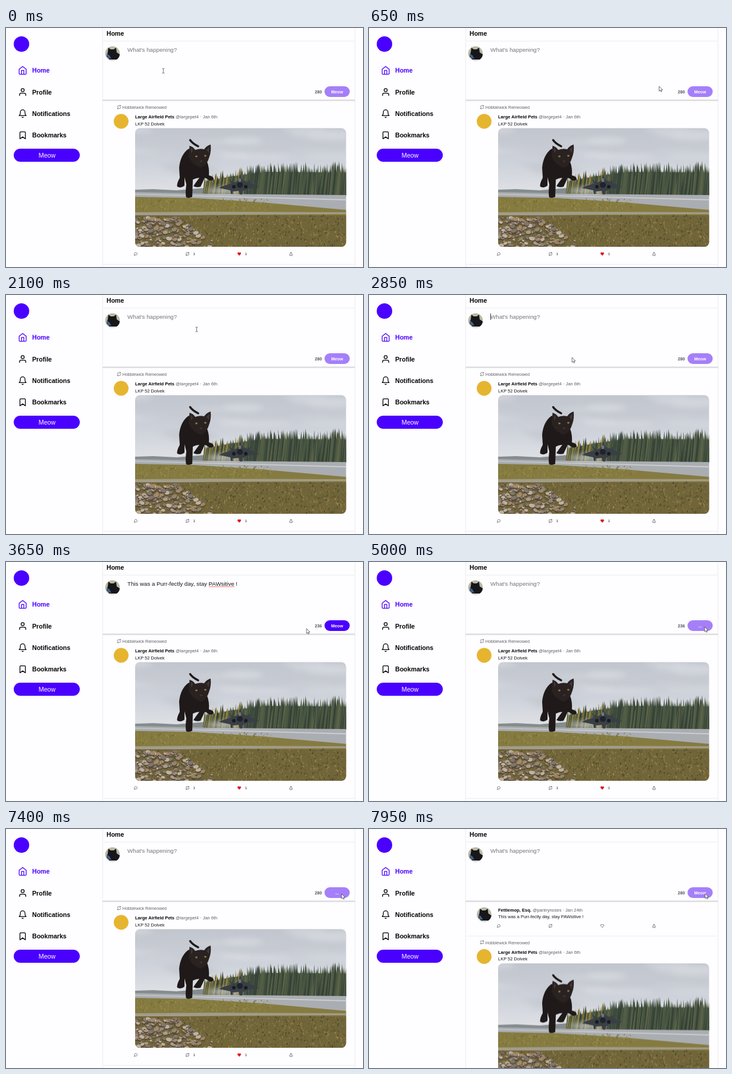
These frames come from a looping animation (600 px wide and 402 px high, 8000 ms). An HTML page:

```html
<!DOCTYPE html>
<html lang="en">
<head>
<meta charset="utf-8">
<title>Meow feed</title>
<style>
html, body { margin: 0; width: 100%; height: 100%; overflow: hidden; background: #fefdff; }
svg { display: block; width: 600px; height: 402px; font-family: "Liberation Sans", Arial, sans-serif; font-size: 7.5px; fill: #17171b; }
.bold { font-weight: 700; }
.nav { font-size: 10.6px; font-weight: 700; fill: #050505; }
.grey { fill: #606066; }
.small { font-size: 7.2px; font-weight: 700; }
.line { stroke: #ededf0; stroke-width: 1; }
.icon { fill: none; stroke: currentColor; stroke-width: 2; stroke-linecap: round; stroke-linejoin: round; }
</style>
</head>
<body>
<svg id="stage" viewBox="0 0 600 402"></svg>
<script>
const PURPLE = '#4a00ff', PALE = '#a57ff9';
const MESSAGE = 'This was a Purr-fectly day, stay PAWsitive !';
const ICONS = {
  home: 'M3 9l9-7 9 7v11a2 2 0 0 1-2 2H5a2 2 0 0 1-2-2zM9 22V12h6v10',
  user: 'M20 21v-2a4 4 0 0 0-4-4H8a4 4 0 0 0-4 4v2M8 7a4 4 0 1 0 8 0a4 4 0 1 0-8 0',
  bell: 'M18 8A6 6 0 0 0 6 8c0 7-3 9-3 9h18s-3-2-3-9M13.7 21a2 2 0 0 1-3.4 0',
  bookmark: 'M19 21l-7-5-7 5V5a2 2 0 0 1 2-2h10a2 2 0 0 1 2 2z',
  repeat: 'M17 1l4 4-4 4M3 11V9a4 4 0 0 1 4-4h14M7 23l-4-4 4-4M21 13v2a4 4 0 0 1-4 4H3',
  comment: 'M3 21l2-6A8.5 8.5 0 1 1 9 19z',
  heart: 'M12 21L3.2 12.3A5.5 5.5 0 0 1 11 4.6l1 1 1-1a5.5 5.5 0 0 1 7.8 7.7z',
  share: 'M4 12v8a2 2 0 0 0 2 2h12a2 2 0 0 0 2-2v-8M16 6l-4-4-4 4M12 2v13'
};

let seed = 11;
const random = (low = 0, high = 1) => {
  seed = (seed * 16807) % 2147483647;
  return low + (high - low) * seed / 2147483647;
};
const pick = list => list[Math.floor(random(0, list.length))];
const many = (count, draw) => Array.from({ length: count }, draw).join('');

const text = (x, y, content, attrs = '') => `<text x="${x}" y="${y}" ${attrs}>${content}</text>`;
const path = (d, fill, attrs = '') => `<path d="${d}" fill="${fill}" ${attrs}/>`;
const rect = (x, y, w, h, fill, attrs = '') =>
  `<rect x="${x}" y="${y}" width="${w}" height="${h}" fill="${fill}" ${attrs}/>`;
const ellipse = (x, y, rx, ry, fill, attrs = '') =>
  `<ellipse cx="${x}" cy="${y}" rx="${rx}" ry="${ry}" fill="${fill}" ${attrs}/>`;
const rule = y => `<path class="line" d="M162 ${y}H587"/>`;
const icon = (name, cx, cy, size, color = '#17171b', fill = 'none') =>
  `<path class="icon" d="${ICONS[name]}" style="color:${color};fill:${fill}"
    transform="translate(${cx - size / 2} ${cy - size / 2}) scale(${size / 24})"/>`;

const portrait = (cx, cy) => `<g transform="translate(${cx} ${cy})" clip-path="url(#round)">
  ${rect(-13, -13, 26, 26, '#b9b9a2')}${rect(-13, 4, 26, 9, '#dedbd4')}
  ${path('M-7-10l4 3h5l4-3 1 8 6 4-1 6-5 2H-5l-5-5 2-7z', '#17161b')}
  ${path('M-10 0l5 3 3 6-6-2z', '#3d648f')}</g>`;

const author = (y, name, rest) =>
  text(217, y, `<tspan class="bold" fill="#050505">${name}</tspan> <tspan class="grey">${rest}</tspan>`);

const actions = (y, count) => icon('comment', 218, y, 6.4) + icon('repeat', 305, y, 6.6) +
  icon('heart', 392, y, 6.6, count ? '#e0101c' : '#17171b', count ? '#e0101c' : 'none') +
  icon('share', 479, y, 6.6) +
  (count ? text(314.5, y + 2.2, count, 'font-size="6.2"') + text(401.5, y + 2.2, count, 'font-size="6.2"') : '');

function trees() {
  return path('M336 258l40-8 60-8 136 1v40H336z', '#4d5842') + many(230, (_, i) => {
    const x = 334 + i * 1.04;
    const rise = Math.min(1, (x - 330) / 105);
    const top = 280 - (30 + 20 * rise) * random(0.6, 1.12);
    const w = random(3, 6);
    const color = x < 405 && random() < 0.55
      ? pick(['#8d7a3a', '#9b8640', '#727040']) : pick(['#3d4b3e', '#46553f', '#525c45', '#354238', '#5c6348']);
    return path(`M${x} ${top}l${w} ${281 - top}h${-2 * w}z`, color);
  });
}

function stones() {
  return many(190, () => {
    const y = random(319, 369), x = 215 + random() * (72 + (y - 318) * 1.5);
    const r = random(1.8, 5.2);
    const tilt = `transform="rotate(${random(-25, 25)} ${x} ${y})"`;
    return ellipse(x, y + 1, r, r * 0.75, '#4c4236', tilt) +
      ellipse(x, y, r * 0.94, r * 0.62, pick(['#aa9c86', '#94846f', '#bfb19f', '#81766b', '#a3896c']), tilt);
  });
}

const grass = (count, x0, x1, y0, y1, colors) => many(count, () =>
  `<path d="M${random(x0, x1)} ${random(y0, y1)}l${random(-2, 2)} ${random(-4, -1)}"
    stroke="${pick(colors)}" stroke-width="${random(0.6, 1.8)}"/>`);

function photo() {
  const cat = '#1f1a19', jet = '#3a3f45';
  return `<g clip-path="url(#frame)">
    ${rect(217, 168, 355, 200, 'url(#sky)')}
    <g filter="url(#soft)">${many(26, () => ellipse(random(215, 575), random(170, 255), random(30, 70), random(3, 8),
      pick(['#dfe2e8', '#c3c7d0', '#d8dbe2']), 'opacity=".5"'))}</g>
    ${path('M217 272l30-1 40 2 60-5v14H217z', '#858c8e')}
    ${trees()}
    ${path('M217 276l130 3 225 2v26l-160-14-195-8z', '#aaadb1')}
    ${path('M217 279l355 9v2l-355-10z', '#cdcfd1')}
    <g filter="url(#soft)">${ellipse(367, 274, 30, 6, '#d3d5d6', 'opacity=".7"')}</g>
    ${path('M217 284l100 2 110 7 145 13v62H217z', '#857b41')}
    ${grass(260, 217, 450, 289, 308, ['#958949', '#71692f', '#9c8e4c', '#7b743c'])}
    ${path('M217 310l130-1 225 1v3l-200 1-155 2z', '#a29c8a')}
    ${rect(217, 315, 355, 53, '#71653a')}
    ${grass(850, 217, 572, 317, 370, ['#8a7b45', '#54502c', '#98804a', '#645f35', '#494627'])}
    ${stones()}
    ${grass(130, 290, 560, 320, 368, ['#9d7439', '#5a572f', '#a88d4a', '#726a3a'])}
    ${path('M393 246l4 9 6 3 21 8-1 3-17 1-4 3-4 1-1 6h-4l-2-6-10 1v4h-3l-1-6-19-4 6-3 22-7 5-4z', jet)}
    ${path('M373 253l11 8-4 2zM414 254l-12 6 4 3z', jet)}
    ${ellipse(393, 264, 5, 5, '#20242b')}${ellipse(393, 256, 2.2, 3.2, '#6c7782')}
    ${ellipse(383, 267, 3, 3, '#181b20')}${ellipse(403, 267, 3, 3, '#181b20')}
    ${rect(404, 273, 2.5, 6, jet)}
    <path d="M309.5 188.5Q313 194 323 199" fill="none" stroke="${cat}" stroke-width="3.4" stroke-linecap="round"/>
    ${path('M307 203Q293 213 291 235L292 252Q286 263 288 267Q295 270 300 265L300 251L303 263Q301 280 303 285Q308 287 313 284L314 255Q320 252 325 252Q318 261 315 266Q320 269 327 267L334 252Q338 253 341 256Q347 258 349 254Q348 249 341 248Q342 235 338 225Z', cat)}
    ${path('M307 216L308.5 198Q315 200 318 205Q326 202 333 204Q337 198 344 196Q345 208 342 216Q338 231 328 235Q313 231 307 216Z', '#292221')}
    ${path('M311 201l3 5-3 5zM342 200l-5 5 4 5z', '#47393a')}
    ${ellipse(320, 216, 1.9, 1.4, '#8d7b46')}${ellipse(335, 215, 1.9, 1.4, '#8d7b46')}
    ${ellipse(328, 224, 2.6, 1.5, '#3b3233')}
  </g>`;
}

const nav = [['home', 'Home'], ['user', 'Profile'], ['bell', 'Notifications'], ['bookmark', 'Bookmarks']];
const stage = document.getElementById('stage');
stage.innerHTML = `
  <defs>
    <clipPath id="round"><circle r="12.3"/></clipPath>
    <clipPath id="frame"><rect x="217" y="168.5" width="354.5" height="199.5" rx="8"/></clipPath>
    <linearGradient id="sky" x2="0" y2="1">
      <stop stop-color="#c1c5cd"/><stop offset=".3" stop-color="#ced2da"/><stop offset=".55" stop-color="#dfe1e5"/>
    </linearGradient>
    <filter id="soft" x="-20%" y="-50%" width="140%" height="200%"><feGaussianBlur stdDeviation="4"/></filter>
  </defs>
  <circle cx="26" cy="27" r="13" fill="${PURPLE}"/>
  ${nav.map(([name, label], i) => {
    const y = 71.3 + i * 36.4, color = i ? '#050505' : PURPLE;
    return icon(name, 28, y, 15.6, color) + text(44, y + 3.8, label, `class="nav" style="fill:${color}"`);
  }).join('')}
  ${rect(13, 203, 111, 22, PURPLE, 'rx="11"')}
  ${text(69, 217.8, 'Meow', 'font-size="10.7" fill="#fff" text-anchor="middle"')}
  <path class="line" d="M162.5 0V402M586.5 0V402"/>
  ${text(169, 12.5, 'Home', 'class="nav"')}
  ${rule(22)}
  ${portrait(179, 43)}
  ${text(204, 39.6, "What's happening?", 'id="hint" font-size="9.75" fill="#747479"')}
  <g id="draft">
    ${text(204, 39.6, MESSAGE, 'font-size="9.7"')}
    <path d="M341.5 41.6H384" stroke="#e33" stroke-width="1" stroke-dasharray="1.3 .7"/>
  </g>
  <path id="caret" d="M204.5 31V42" stroke="#111" stroke-width=".8"/>
  ${text(531, 109.6, '280', 'id="counter" class="small" fill="#55555b" text-anchor="end"')}
  ${rect(535.3, 98, 42.4, 18, PALE, 'id="button" rx="9"')}
  ${text(556.5, 109.6, 'Meow', 'id="label" class="small" fill="#fff" text-anchor="middle"')}
  ${rect(162, 120.3, 425, 2.6, '#dedee2')}
  <g id="newPost">
    ${portrait(193.5, 144)}
    ${author(138.8, 'Fettlemop, Esq.', '@pantrynoses · Jan 24th')}
    ${text(217, 150.3, MESSAGE)}
    ${actions(163, 0)}
    ${rule(180)}
  </g>
  <g id="oldPost">
    ${icon('repeat', 190, 133, 7.4, '#45454b')}
    ${text(195.8, 136, 'Hobblewick Remeowed', 'class="grey" font-size="7.1"')}
    <circle cx="193.5" cy="157" r="12.4" fill="#e6b530"/>
    ${author(152.1, 'Large Airfield Pets', '@largepet4 · Jan 6th')}
    ${text(217, 163.6, 'LKP 52 Dolvek')}
    ${photo()}
    ${actions(380, 1)}
    ${rule(397.5)}
  </g>
  <path id="beam" d="M-2-4Q0-4 0-3Q0-4 2-4M0-3V3M-2 4Q0 4 0 3Q0 4 2 4" fill="none" stroke="#4c4c50" stroke-width=".8"/>
  <path id="arrow" d="M0 0V8.2L1.9 6.5L3.2 9.3L4.5 8.7L3.2 6H5.8Z" fill="#fff" stroke="#333" stroke-width=".7"/>`;

const part = Object.fromEntries([...stage.querySelectorAll('[id]')].map(el => [el.id, el]));
const show = (el, visible) => el.setAttribute('visibility', visible ? 'visible' : 'hidden');

const FOCUS = 2400, PASTE = 3100, SEND = 4650, RESET = 6350, POSTED = 7740;
// time, x, y of the mouse
const MOUSE = [
  [0, 264, 72], [850, 556, 106], [1050, 568, 108], [1400, 524, 110], [1500, 524, 110],
  [2250, 270, 45], [2450, 262, 46], [2850, 341, 105], [3150, 400, 110], [3650, 505, 112],
  [4400, 564, 109], [7740, 564, 109], [7950, 565, 108.6], [8000, 565, 108.6]
];

function mouseAt(t) {
  const i = MOUSE.findIndex(key => key[0] > t);
  const [t0, x0, y0] = MOUSE[i - 1], [t1, x1, y1] = MOUSE[i];
  const u = (t - t0) / (t1 - t0);
  return [x0 + (x1 - x0) * u, y0 + (y1 - y0) * u];
}

function render(t) {
  const written = t >= PASTE && t < SEND;
  const posted = t >= POSTED;
  show(part.hint, !written);
  show(part.draft, written);
  const blink = (t - (written ? PASTE : FOCUS)) % 1000 < 500;
  show(part.caret, t >= FOCUS && t < SEND && blink);
  part.caret.setAttribute('transform', `translate(${written ? 187 : 0} 0)`);

  part.counter.textContent = t >= PASTE && t < RESET ? 280 - MESSAGE.length : 280;
  part.button.setAttribute('fill', written ? PURPLE : PALE);
  part.label.textContent = t >= SEND && !posted ? '...' : 'Meow';

  show(part.newPost, posted);
  part.oldPost.setAttribute('transform', `translate(0 ${posted ? 57.5 : 0})`);

  const [x, y] = mouseAt(t);
  const overText = y < 95 || (x > 517 && x < 533 && y < 111);
  for (const el of [part.beam, part.arrow]) el.setAttribute('transform', `translate(${x} ${y})`);
  show(part.beam, overText);
  show(part.arrow, !overText);
}

const start = performance.now();
function tick() {
  render((performance.now() - start) % 8000);
  requestAnimationFrame(tick);
}
tick();
</script>
</body>
</html>
```
